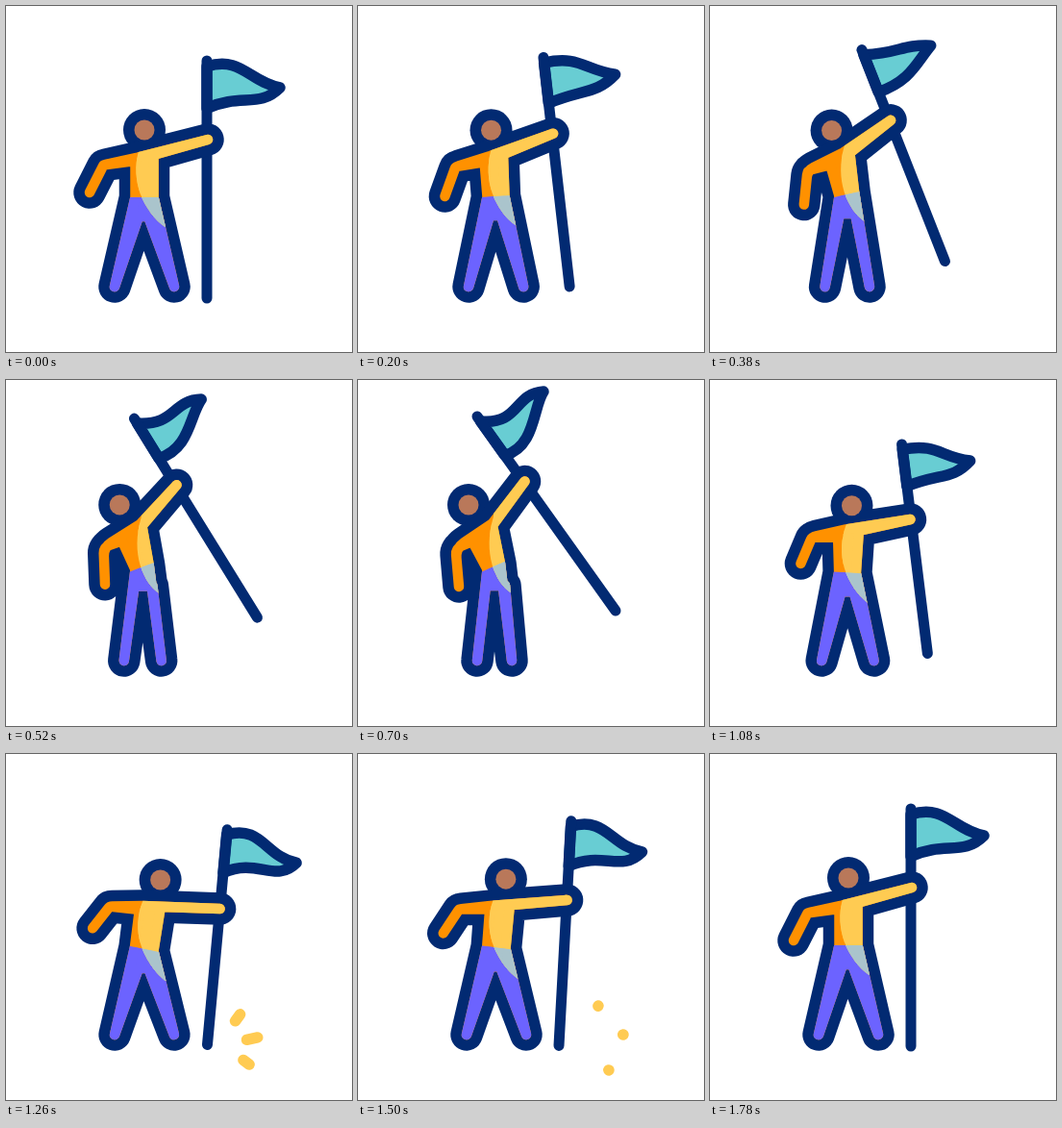
An HTML page with a canvas for the animation above (2400 ms loop, 360 by 360 pixels).

```html
<!DOCTYPE html>
<html lang="en">
<head>
<meta charset="utf-8">
<title>Planting a flag</title>
<style>
html, body { margin: 0; width: 100%; height: 100%; overflow: hidden; background: #fff; }
canvas { display: block; width: 360px; height: 360px; }
</style>
</head>
<body>
<canvas id="stage"></canvas>
<script>
const canvas = document.getElementById('stage');
const ctx = canvas.getContext('2d');
const ratio = window.devicePixelRatio || 1;
canvas.width = canvas.height = 360 * ratio;

const LOOP = 2400;
const NAVY = '#022a72', ORANGE = '#ff9100', YELLOW = '#ffcb52', PURPLE = '#6c63ff';
const TEAL = '#68cdd3', SKIN = '#b9785a', HIP = '#aac4cc';
const LIMB = 10.5, OUTLINE = 33.5;

// Joints of each pose; lift is 1 with the flag held high and 0 with it down.
const rest = {
  lift: [0], head: [144, 129], neck: [137, 157.5], tip: [285, 85],
  poleTop: [209, 57], poleEnd: [209, 304],
  handL: [87, 194], elbow: [101.5, 165.5], pitL: [134.5, 161], hipL: [134.5, 199],
  handR: [210, 139], pitR: [153.5, 155], hipR: [153.5, 199]
};
const raised = {
  lift: [1], head: [115, 130], neck: [140, 149], tip: [193, 12],
  poleTop: [124, 38], poleEnd: [268, 240],
  handL: [105, 215], elbow: [101.5, 175], pitL: [119, 168], hipL: [134.5, 197],
  handR: [173.5, 105.5], pitR: [140, 151.5], hipR: [148, 191]
};
const planted = {
  lift: [0], head: [161, 131], neck: [142, 158], tip: [303, 114],
  poleTop: [231, 79], poleEnd: [209, 303],
  handL: [90, 181], elbow: [108, 158.5], pitL: [139, 162], hipL: [134, 201],
  handR: [223, 161.5], pitR: [161, 159], hipR: [153.5, 205]
};
const moves = [
  [28, 650, rest, raised],
  [704, 1292, raised, planted],
  [1325, 1720, planted, rest]
];
const sparks = [
  [[237, 280], [250, 262]],
  [[247, 298], [276, 292]],
  [[245, 317], [261, 329]]
];

function ease(t, from, to) {
  const u = Math.min(1, Math.max(0, (t - from) / (to - from)));
  return u * u * (3 - 2 * u);
}

const mix = (a, b, p) => a.map((v, i) => v + (b[i] - v) * p);
const shift = ([x, y], dx, dy) => [x + dx, y + dy];

function poseAt(t) {
  const [from, to, a, b] = moves.filter(m => t >= m[0]).pop() || moves[0];
  const p = ease(t, from, to);
  const pose = {};
  for (const key in a) pose[key] = mix(a[key], b[key], p);
  pose.lift = pose.lift[0];
  return pose;
}

function trace(...points) {
  for (const p of points) ctx.lineTo(...p);
}

function paint(color, width) {
  ctx.lineWidth = width;
  ctx.fillStyle = ctx.strokeStyle = color;
  ctx.fill();
  ctx.stroke();
}

function line(a, b, width, color) {
  ctx.beginPath();
  trace(a, b);
  ctx.lineWidth = width;
  ctx.strokeStyle = color;
  ctx.stroke();
}

function disc([x, y], r, color) {
  ctx.beginPath();
  ctx.arc(x, y, r, 0, Math.PI * 2);
  ctx.fillStyle = color;
  ctx.fill();
}

function drawFlag({ poleTop, poleEnd, tip, lift }) {
  const high = mix(poleTop, poleEnd, 0.024);
  const low = mix(poleTop, poleEnd, 0.2);
  const curl = (x0, y0, x1, y1) => mix([x0, y0], [x1, y1], lift);
  ctx.beginPath();
  ctx.moveTo(...high);
  ctx.bezierCurveTo(...shift(high, ...curl(36, -11, 41, 4)),
    ...shift(tip, ...curl(-32, -6, -31, 2)), ...tip);
  ctx.bezierCurveTo(...shift(tip, ...curl(-22, 22, -11, 16)),
    ...shift(low, ...curl(36, -16, 32, -9)), ...low);
  ctx.closePath();
  ctx.lineWidth = 11.5;
  ctx.fillStyle = TEAL;
  ctx.strokeStyle = NAVY;
  ctx.fill();
  ctx.stroke();
  line(poleTop, poleEnd, 11, NAVY);
}

function traceLegs({ hipL, hipR, lift }) {
  const crotch = [143, (hipL[1] + hipR[1]) / 2 + 20];
  const gap = 5 + 5 * lift;
  trace(hipR, [175 - 15 * lift, 292], shift(crotch, gap, 0),
    shift(crotch, -gap, 0), [113 + 11 * lift, 292], hipL);
}

function bodyPath(pose) {
  const { handL, elbow, neck, handR, pitR, pitL, lift } = pose;
  const bend = 5 + 13 * lift;
  ctx.beginPath();
  ctx.moveTo(...handL);
  ctx.arcTo(...elbow, ...neck, bend);
  trace(neck, handR, pitR);
  traceLegs(pose);
  trace(pitL);
  ctx.arcTo(...elbow, ...handL, bend / 2);
  ctx.closePath();
}

function clipBelowBelt({ hipL, hipR }) {
  ctx.beginPath();
  trace(mix(hipL, hipR, -5), mix(hipL, hipR, 6), [360, 360], [0, 360]);
  ctx.clip();
}

// The lighter side lies right of a curve from the neck to the right thigh.
function clipLightSide({ neck, hipL, hipR }) {
  const start = shift(neck, 1, -7), end = shift(hipR, 12, 31);
  ctx.beginPath();
  ctx.moveTo(...start);
  ctx.bezierCurveTo(...shift(hipL, -5, -17), ...shift(hipL, 8, 14), ...end);
  trace([360, end[1]], [360, 0], [start[0], 0]);
  ctx.clip();
}

function paintClothes(pose, top, bottom) {
  bodyPath(pose);
  paint(top, LIMB);
  ctx.save();
  clipBelowBelt(pose);
  ctx.beginPath();
  traceLegs(pose);
  ctx.closePath();
  paint(bottom, LIMB);
  ctx.restore();
}

function drawPerson(pose) {
  disc(pose.head, 22, NAVY);
  bodyPath(pose);
  paint(NAVY, OUTLINE);
  disc(pose.head, 10.5, SKIN);
  paintClothes(pose, ORANGE, PURPLE);
  ctx.save();
  clipLightSide(pose);
  paintClothes(pose, YELLOW, HIP);
  ctx.restore();
}

function drawSparks(t) {
  if (t < 1190 || t >= 1540) return;
  const lead = ease(t, 1180, 1340), trail = ease(t, 1190, 1520);
  for (const [from, to] of sparks) {
    line(mix(from, to, trail), shift(mix(from, to, lead), 0.01, 0), 11.5, YELLOW);
  }
}

function draw() {
  const t = performance.now() % LOOP;
  const pose = poseAt(t);
  ctx.setTransform(ratio, 0, 0, ratio, 0, 0);
  ctx.fillStyle = '#fff';
  ctx.fillRect(0, 0, 360, 360);
  ctx.lineCap = ctx.lineJoin = 'round';
  drawFlag(pose);
  drawPerson(pose);
  drawSparks(t);
  requestAnimationFrame(draw);
}
draw();
</script>
</body>
</html>
```
